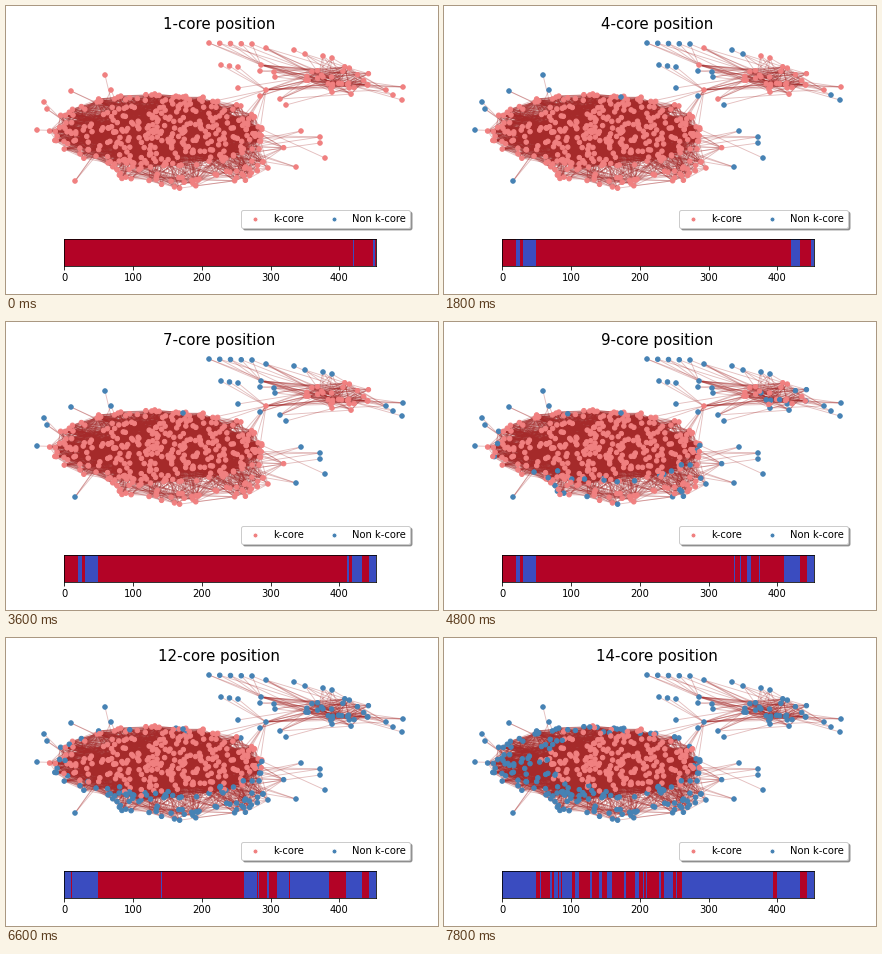
Animation of 432x288 px, one loop 8 s. Source, as a matplotlib script:

```python
import numpy as np
import matplotlib.pyplot as plt
from matplotlib.animation import FuncAnimation
from matplotlib.collections import LineCollection
from matplotlib.lines import Line2D

W, H = 432, 288
FRAMES, INTERVAL, HOLD = 40, 200, 3
NODES = 454
CORAL, STEEL = "lightcoral", "steelblue"
rng = np.random.default_rng(12)
plt.rcParams["font.family"] = "DejaVu Sans"

# Loose nodes, from the most weakly to the most strongly tied
STRAYS = [(99, 69), (38, 96), (314, 137), (319, 152), (31, 124), (105, 84),
          (295, 125), (41, 103), (65, 85), (69, 175), (177, 91), (314, 131),
          (290, 161)]
SATELLITES = [(396, 94), (280, 99), (288, 44), (232, 82), (254, 65), (254, 90),
              (387, 89), (299, 48), (268, 66), (269, 71), (260, 42), (397, 81),
              (317, 50), (326, 52), (274, 93), (380, 84)]
HUBS = np.array([(255, 59), (260, 84)], float)

# First index of each stretch of the strip and its typical core number
ZONES = [(0, 11.5), (14, 10), (20, 3), (26, 9), (31, 2.5), (50, 13.2),
         (112, 14.4), (236, 12.8), (262, 11.3), (338, 9), (386, 12), (410, 7),
         (421, 0), (422, 2.5), (433, 13), (444, 4.5), (450, 0), (452, 3)]


def strip_cores():
    """Short runs of equal core, scattered around the zone's value."""
    starts, means = np.array(ZONES).T
    zone = np.searchsorted(starts, np.arange(NODES), side="right") - 1
    new_run = (rng.random(NODES) < .3) | (np.diff(zone, prepend=-1) > 0)
    factor = rng.normal(1, .1, NODES)[np.cumsum(new_run) - 1]
    return np.rint(means[zone] * factor)


def disc(n, x, y, rx, ry, power=.5):
    """Random points in an ellipse; a higher power crowds the middle."""
    r, a = rng.random(n) ** power, rng.uniform(0, 2 * np.pi, n)
    return np.c_[x + rx * r * np.cos(a), y + ry * r * np.sin(a)]


def body_cores(pts):
    x, y = pts.T
    n = len(pts)
    inner = np.hypot((x - 178) / 78, (y - 121) / 30) + rng.normal(0, .12, n)
    outer = np.hypot((x - 155) / 104, (y - 121) / 33) + rng.normal(0, .08, n)
    return np.where(inner < 1, 14,
                    np.where(outer < 1, rng.integers(12, 14, n),
                             rng.integers(8, 12, n)))


def lower_band(n):
    """Nodes along the underside; core number drops towards the rim."""
    a = np.pi * .83 * rng.random(n) ** 1.1
    r = rng.uniform(.7, 1, n)
    pts = np.c_[180 + 100 * r * np.cos(a), 140 + 44 * r * np.sin(a)]
    return pts, np.rint(11 - 14 * (r - .75) + rng.normal(0, 1, n)).clip(5, 11)


def ranked(pts, top):
    """Points with core numbers rising evenly from 1 to top."""
    return np.array(pts, float), 1 + np.arange(len(pts)) * top // len(pts)


def link(points, pool, counts, nearest):
    """Join each point to some of its nearest pool members."""
    edges = []
    for p, n in zip(points, np.broadcast_to(counts, len(points))):
        order = np.argsort(np.hypot(*(pool - p).T))[1:nearest + 1]
        edges += [(p, pool[j]) for j in rng.choice(order, int(n), replace=False)]
    return edges


def build_graph():
    body = disc(336, 152, 124.5, 109, 38, .55)
    band, band_core = lower_band(50)
    strays, stray_core = ranked(STRAYS, 3)
    sats, sat_core = ranked(SATELLITES, 5)
    cluster = disc(29, 333, 75, 35, 15)
    top = np.c_[np.linspace(203, 246, 5), np.linspace(37, 38, 5)]
    low = np.c_[np.linspace(215, 232, 3), np.linspace(59, 61, 3)]

    edges = link(body, body, 8, len(body))
    edges += link(body, body, 5, 60)
    edges += link(band, body, 7, 150)
    edges += link(band, band, 2, 25)
    edges += link(strays, body, stray_core, 110)
    edges += link(cluster, cluster, 5, 27)
    edges += link(sats, cluster, sat_core, 20)
    edges += link(HUBS, cluster, 12, 27)
    edges += link(HUBS[1:], body[body[:, 0] > 170], 8, 60)
    edges += [(p, HUBS[0]) for p in top] + [(p, HUBS[1]) for p in low]
    edges += link(top, cluster, 1, 6)

    pts = np.vstack([body, band, strays, sats, cluster, HUBS, top, low])
    cores = np.concatenate([
        body_cores(body), band_core, stray_core, sat_core,
        rng.integers(8, 12, len(cluster)), [6, 11],
        1 + np.arange(len(top)) % 3, 1 + np.arange(len(low)) % 3])
    return pts, cores, edges


fig = plt.figure(figsize=(W / 72, H / 72), dpi=72, facecolor="white")
ax = fig.add_axes([0, 0, 1, 1])
ax.set(xlim=(0, W), ylim=(H, 0))
ax.axis("off")

points, cores, edges = build_graph()
ax.add_collection(LineCollection(edges, colors="brown", alpha=.3,
                                 linewidths=.9, zorder=1))
nodes = ax.scatter(*points.T, s=20, c=CORAL, linewidths=1, zorder=2)
title = ax.text(213.4, 23, "", size=15, ha="center", va="baseline")

handles = [Line2D([], [], color="w", marker="o", ms=5, mfc=c, label=label)
           for c, label in [(CORAL, "k-core"), (STEEL, "Non k-core")]]
ax.legend(handles=handles, ncol=2, shadow=True, fontsize=10,
          loc="lower left", bbox_to_anchor=(235.3, 222),
          bbox_transform=ax.transData, borderaxespad=0)

strip = strip_cores()
bar = fig.add_axes([58 / W, 1 - 260.3 / H, 312 / W, 27 / H])
image = bar.imshow([strip >= 1], cmap="coolwarm", vmin=0, vmax=1,
                   aspect="auto", interpolation="nearest")
bar.set_yticks([])
bar.set_xticks(range(0, 401, 100))
bar.tick_params(labelsize=10)


def update(frame):
    k = 1 + frame // HOLD
    title.set_text(f"{k}-core position")
    nodes.set_color(np.where(cores >= k, CORAL, STEEL))
    image.set_data([(strip >= k).astype(float)])
    return title, nodes, image


anim = FuncAnimation(fig, update, frames=FRAMES, interval=INTERVAL,
                     repeat=True, repeat_delay=0)
plt.show()
```
